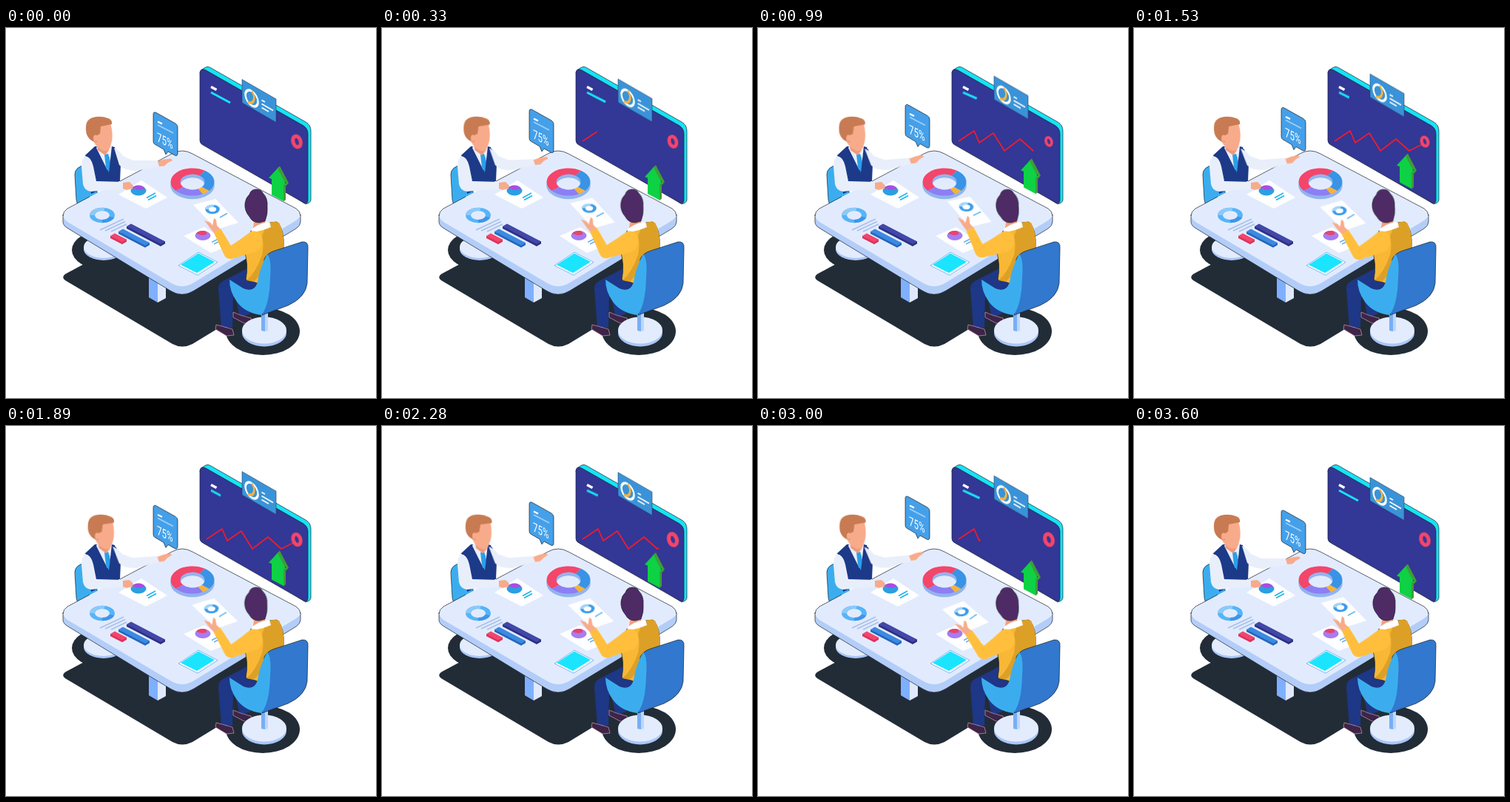
Animation, 500 px wide and 500 px high, one loop 3.66 s. Source, as an HTML page:

```html
<!DOCTYPE html>
<html lang="en">
<head>
<meta charset="utf-8">
<title>Meeting</title>
<style>
html, body { margin: 0; width: 100%; height: 100%; overflow: hidden; background: #fff; }
svg { display: block; width: 100vw; height: 100vh; }
.edge { stroke: #16202c; stroke-width: .7; }
.shadow { fill: #222c36; }
.line { fill: none; stroke-linecap: butt; }
.skin { fill: #f8ab8a; }
.shirt { fill: #e9eefb; }
#title { transform-origin: 277px 87px; }
#dot { transform-origin: 393px 153.5px; }
#head { transform-origin: 128px 170px; }
#reach { transform-origin: 160px 187px; }
#arm { transform-origin: 335px 285px; }
#hair { transform-origin: 343px 268px; }
</style>
</head>
<body>
<svg viewBox="0 0 500 500">
  <!-- wall screen -->
  <path class="edge" fill="#18e2f6" d="M262 61Q262 57 270 53Q273 51 277 54L405 127Q412 131 412 139V232Q412 236 405 238L300 170Z"/>
  <path class="edge" fill="#333795" d="M262 62Q262 53 270 57L402 132Q408 136 408 143V232Q408 239 402 236L266 158Q262 156 262 152Z"/>
  <path class="line" stroke="#fff" stroke-width="3.4" d="M277 79.5L284.500 83.500"/>
  <path id="title" class="line" stroke="#18e2f6" stroke-width="3" d="M277 87L303 101"/>
  <path id="graph" class="line" stroke="#ee1c30" stroke-width="1.8" stroke-linejoin="round" pathLength="100" stroke-dasharray="100 110" d="M271 153L292 139L299 155L318 142L333 166L354 150L372 166L392 156"/>
  <g id="dot">
    <ellipse cx="393" cy="153.500" rx="5" ry="7.500" fill="none" stroke="#f4456a" stroke-width="5" transform="rotate(-18 393 153.500)"/>
  </g>
  <g id="card">
    <path fill="#3a93d8" stroke="#246" stroke-width=".6" d="M319 69.500L365 96V127.500L319 101Z"/>
    <g transform="matrix(.866 .5 0 1 332 95)" fill="none" stroke-width="3">
      <circle r="9.800" stroke="#fff"/>
      <path stroke="#f8b23c" d="M0 -9.800A9.800 9.800 0 0 1 -6 7.700"/>
    </g>
    <path class="line" stroke="#fff" stroke-width="1.600" d="M345.500 97.500L350 100M345.500 102.500L361 111.500M345.500 107.500L355 113"/>
  </g>
  <g id="arrow">
    <path fill="#3f9d35" d="M370 186.500L366 190L378 214L382 209.500ZM373 209L378 208V232L375 234.500Z"/>
    <path fill="#0ed145" d="M367 189.500L355 202.500L359 204V225.500L375 234V211L379 213Z"/>
  </g>

  <!-- floor -->
  <path class="shadow" d="M81 332L225 255H250L398 338L252 427Q238 434 225 427L80 341Q74 337 81 332Z"/>
  <ellipse class="shadow" cx="133" cy="300" rx="44" ry="27"/>
  <ellipse class="shadow" cx="347" cy="410" rx="50" ry="32"/>
  <ellipse cx="132" cy="299" rx="27" ry="15" fill="#a9c6f7"/>
  <ellipse cx="132" cy="296" rx="27" ry="15" fill="#e3ecfd"/>
  <path fill="#7fafff" d="M193 335L205 342V371L193 364Z"/>
  <path fill="#dfe9fb" d="M205 342L216 338V365L205 371Z"/>

  <!-- seated left -->
  <path class="edge" fill="#3badee" d="M107 185Q93 188 93 198L95 232Q97 245 106 242L125 232L118 195Z"/>
  <path fill="#1d3a88" d="M120 160L107 172Q112 190 115 224L154 207L155 184L149 164L141 160Z"/>
  <path class="shirt" d="M122 162L137 192L146 161L140 158H124Z"/>
  <path fill="#2b9fe9" d="M133 171L138 170L140 176L142 190L139 195L135 188Z"/>
  <path fill="#1d3a88" d="M121 161L115 168L132 206L140 207L136 192ZM143 160L147 161L153 190L146 206L139 196L141 178Z"/>
  <g id="head">
    <path fill="#ee9878" d="M122 154L139 156V165L134 172L124 165Z"/>
    <path class="skin" d="M120 135L141 128Q146 146 142 157Q140 167 133 166Q124 164 118 153Z"/>
    <path fill="#c87b53" d="M113 150Q108 145 108 137Q107 124 117 121Q128 118 138 122Q144 124 143 130L128 133L127 143L123 145V154Q117 154 113 150Z"/>
    <ellipse class="skin" cx="121" cy="149" rx="3" ry="4.500"/>
  </g>

  <!-- table -->
  <path class="edge" fill="#b3cdf9" d="M77 252V262Q77 267 84 271L222 355Q238 365 254 355L392 271Q398 267 398 262V252Z"/>
  <path fill="#e2ebfd" d="M83 244L224 170Q238 162 252 170L392 244Q404 252 392 260L254 344Q238 354 222 344L83 262Q72 253 83 244Z"/>
  <path class="line edge" d="M154 207L224 170Q238 162 252 170L392 244Q398 248 398 254M77 254Q77 248 83 244L113 228"/>

  <g transform="translate(130 253) scale(1 .6)" fill="none" stroke-width="7">
    <circle r="13.500" stroke="#56b5f7"/>
    <path stroke="#8cc9fa" d="M-13.500 0A13.500 13.500 0 0 1 3 -13.200"/>
    <path stroke="#3f95ea" d="M13 4A13.500 13.500 0 0 1 0 13.500"/>
  </g>
  <path class="line" stroke="#a8bfec" stroke-width="1.600" d="M127 273L159 258M134 274L161 261.500M142 275L163 265"/>
  <g id="bars"></g>

  <path fill="#fff" d="M152 225L183 206L218 229L189 244Z"/>
  <ellipse cx="179" cy="220" rx="10.500" ry="6.500" fill="#2b9fe0"/>
  <path fill="#a64fe2" d="M179 219L170 216Q174 212 180 212.500Q186 213 188 217Z"/>
  <path class="line" stroke="#27b6ea" stroke-width="1.800" d="M190 229.500L202 223M192 232.500L203 226.500"/>

  <g transform="translate(252 212.500) scale(1 .63)">
    <circle r="23" fill="none" stroke="#91b4ee" stroke-width="13.500"/>
  </g>
  <g id="ring" transform="translate(252 208) scale(1 .63)" fill="none" stroke-width="13"></g>

  <path fill="#fff" d="M240 281L268 269L304 293L277 304Z"/>
  <ellipse cx="266" cy="280.500" rx="10.500" ry="6.500" fill="#a57cf2"/>
  <path fill="#e9436c" d="M265 280L257 278Q259 273.500 268 274Q272 275 271 279Z"/>
  <path class="line" stroke="#68b1ee" stroke-width="1.500" d="M278 289.500L289 284M281 292L291 287"/>
  <path fill="#fff" stroke="#4e9de5" stroke-width=".7" d="M233 321L260 303L286 316.500L259 334Z"/>
  <path fill="#1be4ff" d="M236 320L260 304.500L282 316L258 331Z"/>

  <!-- arms left -->
  <path class="shirt" d="M107 173Q102 177 102 187L104 211Q106 220 115 221L159 217V208L122 207L118 187Q115 174 107 173Z"/>
  <path class="skin" d="M158 209L167 208L172 213L171 217L163 219L158 217Z"/>
  <g id="reach">
    <path class="shirt" d="M146 162Q152 164 158 173L172 179L205 179L208 187L176 193Q160 193 153 185Z"/>
    <path class="skin" d="M205 180L214 177.500L223 176.500L225 179L219 182L214 186.500L207 187Z"/>
  </g>

  <g id="bubble">
    <path class="edge" fill="#45a0e9" d="M199 117Q199 112 204 115L229 129Q232 131 232 134V169Q232 174 228 172L219 167L216 171L213 164L201 157Q199 156 199 153Z"/>
    <path class="line" stroke="#fff" stroke-width="2.200" d="M205 126.500L211 129.500"/>
    <path class="line" stroke="#9fd0fa" stroke-width="1.700" d="M205 131L226 142"/>
    <text transform="matrix(.68 .34 0 1 204 153)" font-family="Roboto, sans-serif" font-size="17" fill="#fff">75%</text>
  </g>

  <!-- seated right -->
  <g fill="#1e3787">
    <path d="M307 350L323 348L330 386L316 391Z"/>
    <path d="M328 324L293 342Q286 346 287 354L291 404L306 405L307 362L345 372L352 338Z"/>
  </g>
  <g fill="#3c2549" stroke="#d99aa9" stroke-width=".7">
    <path d="M307 384L317 388L331 392L332 399L322 399L307 391Z"/>
    <path d="M284 401L292 403L306 407L308 415L298 416L283 407Z"/>
  </g>
  <path class="edge" fill="#f8b735" d="M331 274Q343 263 366 262Q377 272 375 299L350 348L324 340Q328 320 322 300Z"/>
  <path fill="#dda027" d="M352 266Q359 260 369 263Q377 277 375 300L352 324L335 343L325 341Q338 330 346 307Q349 292 346 281Z"/>
  <path fill="#f3a080" d="M336 257L350 260V268L340 273L334 270Z"/>
  <path fill="#fff" d="M331 273Q340 264 356 262L358 269Q347 274 334 276Z"/>
  <g id="arm">
    <path fill="#fff" d="M253 239L283 231L314 263L285 272Z"/>
    <g transform="translate(279 245) scale(1 .64)" fill="none" stroke-width="4.500">
      <circle r="7.500" stroke="#3c9cec"/>
      <path stroke="#a4d5fb" d="M-7.500 0A7.500 7.500 0 0 1 2 -7.200"/>
    </g>
    <path class="line" stroke="#62b7f0" stroke-width="1.500" d="M289 256L299 250.500"/>
    <path class="skin" d="M268 260L276 263L279 267L281 257L284 259L285 267L291 273L284 280L277 272Z"/>
    <path fill="#ffbf3d" d="M281 277L290 271L304 294Q318 285 331 275Q345 272 346 288Q346 301 335 303L305 312Q297 313 294 305Z"/>
  </g>
  <path id="hair" fill="#4f2b65" class="edge" d="M329 225Q331 218 338 218Q345 218 347 223Q354 230 353 241Q354 251 350 261L342 263Q333 263 329 255Q322 247 323 237Q324 229 329 225Z"/>

  <!-- chair right -->
  <path fill="#79aef4" d="M345 383H349V410H345Z"/>
  <ellipse cx="349" cy="412" rx="30" ry="18.500" fill="#a9c6f7"/>
  <ellipse cx="349" cy="408.500" rx="30" ry="18" fill="#e3ecfd"/>
  <path fill="#79aef4" d="M345 383H350V410L345 409Z"/>
  <path fill="#bed6fb" d="M350 383H354V409L350 410Z"/>
  <path class="edge" fill="#3178ce" d="M349 312Q353 304 363 301L400 289Q409 288 408 298L407 345Q405 364 381 375L346 388Z"/>
  <path fill="#3badee" d="M302 340L321 352Q336 358 340 343Q343 323 353 306Q359 311 357 338Q356 375 345 388Q323 385 312 370Q302 356 302 340Z"/>
</svg>
<script>
const LOOP = 3660;
const SINE = 'cubic-bezier(.37,0,.63,1)';
const $ = id => document.getElementById(id);

function add(parent, tag, attrs) {
  const el = document.createElementNS('http://www.w3.org/2000/svg', tag);
  for (const key in attrs) el.setAttribute(key, attrs[key]);
  parent.append(el);
}

// Isometric bars: start x, y, run, top colour, side colour
for (const [x, y, run, top, side] of [
  [163, 268, 46, '#4247a8', '#2c3084'],
  [152, 275, 36, '#3b8ae2', '#2566bb'],
  [141, 281, 16, '#f4456a', '#d93460']
]) {
  const rise = run * .52;
  add($('bars'), 'path', { fill: side, d: `M${x} ${y}v3l${run} ${rise}l6 -3.500v-3Z` });
  add($('bars'), 'path', { fill: top, d: `M${x} ${y}l6 -3.500l${run} ${rise}l-6 3.500Z` });
}

// Ring segments: start and end angle, colour
for (const [from, to, stroke] of [
  [140, 305, '#f4456a'], [305, 400, '#3993e6'],
  [40, 62, '#f5b23c'], [62, 140, '#8d7ef3']
]) {
  const at = a => [Math.cos(a * Math.PI / 180) * 23, Math.sin(a * Math.PI / 180) * 23].join(' ');
  add($('ring'), 'path', { stroke, d: `M${at(from)}A23 23 0 0 1 ${at(to)}` });
}

// Steps are [ms, value]; the last step closes the loop.
function play(id, prop, steps, format) {
  const frames = steps.map(([ms, v]) => ({ offset: ms / LOOP, [prop]: format(v), easing: SINE }));
  $(id).animate(frames, { duration: LOOP, iterations: Infinity }).startTime = start;
}

const start = document.timeline.currentTime || 0;
const swing = v => [[0, 0], [LOOP / 2, v], [LOOP, 0]];
const lift = v => `translateY(${v}px)`;
const turn = v => `rotate(${v}deg)`;

play('arrow', 'transform', swing(-18), lift);
play('card', 'transform', swing(-8), lift);
play('title', 'transform', [[0, 1], [LOOP / 2, .5], [LOOP, 1]],
  v => `matrix(${v},${(v - 1) * .538},0,1,0,0)`.replace(/.*/, () => {
    // Shorten along the slanted direction, keeping the line weight.
    const k = 14 / 26;
    return `matrix(${v},${k * (v - 1)},0,1,0,0)`;
  }));
play('graph', 'strokeDashoffset', [[0, 101], [1300, 0], [1900, 0], [3600, 101], [LOOP, 101]], String);
play('dot', 'transform', [[0, 1], [1080, .74], [2280, 1.05], [LOOP, 1]], v => `scale(${v})`);
play('bubble', 'transform', [[0, 0], [800, -11], [1700, -6], [3050, -19], [3600, 0], [LOOP, 0]], lift);
play('head', 'transform', [[0, 0], [500, .65], [1450, 0], [2280, 1], [LOOP, 0]],
  v => `translateX(${2.5 * v}px) rotate(${4 * v}deg)`);
play('reach', 'transform', [[0, 0], [660, -4.500], [2280, -4], [3000, -6], [LOOP, 0]], turn);
play('arm', 'transform', [[0, 0], [825, 4.200], [1530, -2], [2280, -2], [3000, -6], [LOOP, 0]], turn);
play('hair', 'transform', [[0, 0], [1200, -2.500], [2280, 0], [3000, -2.500], [LOOP, 0]], turn);
</script>
</body>
</html>
```
